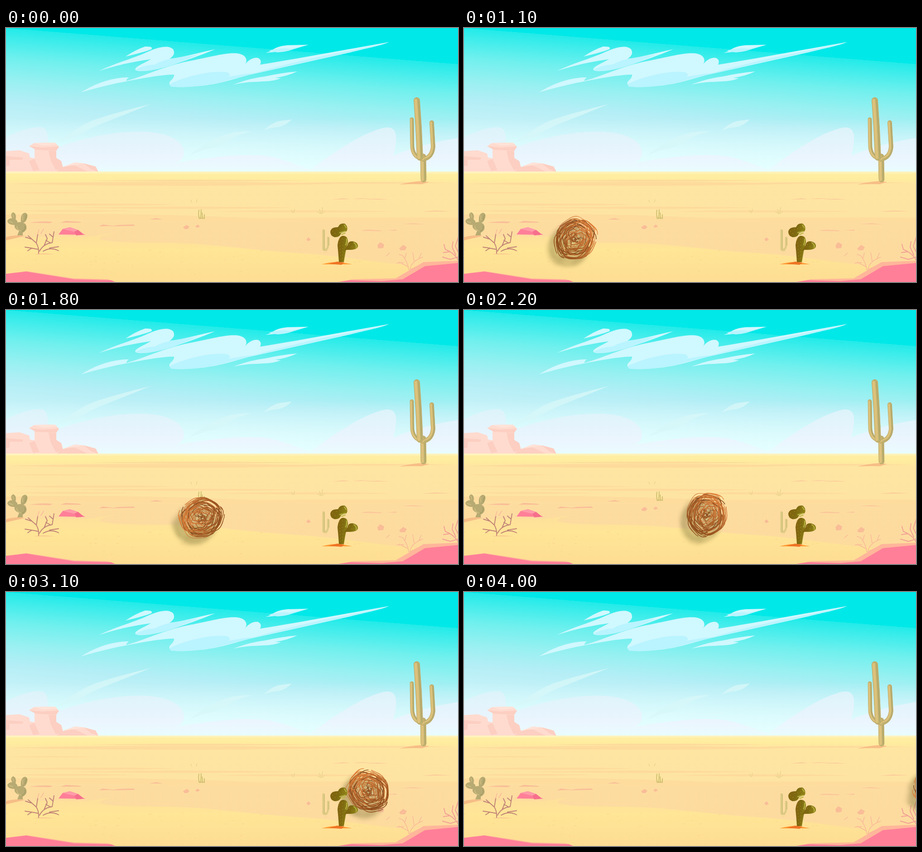
An HTML page that plays this animation: 998x561 px, repeating every 4100 ms.

```html
<!DOCTYPE html>
<html lang="en">
<head>
<meta charset="utf-8">
<title>Desert</title>
<style>
  html, body { margin: 0; width: 100%; height: 100%; overflow: hidden; background: #fee2a0; }
  svg { display: block; width: 998px; height: 561px; }
  #shade { filter: drop-shadow(-14px 15px 4px rgba(105, 96, 40, .45)); }
  .line { fill: none; stroke-linecap: round; stroke-linejoin: round; }
</style>
</head>
<body>
<svg viewBox="0 0 998 561">
  <defs>
    <linearGradient id="sky" gradientUnits="userSpaceOnUse" x1="0" y1="0" x2="-24" y2="300">
      <stop offset="0" stop-color="#00e8e8"/>
      <stop offset="0" stop-color="#22ebe9"/>
      <stop offset=".08" stop-color="#40edeb"/>
      <stop offset=".22" stop-color="#70f0ee"/>
      <stop offset=".38" stop-color="#98f0f1"/>
      <stop offset=".54" stop-color="#b6eef6"/>
      <stop offset=".68" stop-color="#c4f2f8"/>
      <stop offset="1" stop-color="#e0fdff"/>
    </linearGradient>
    <linearGradient id="haze" x2="0" y2="1">
      <stop offset="0" stop-color="#e6ffff" stop-opacity="0"/>
      <stop offset="1" stop-color="#e6ffff"/>
    </linearGradient>
    <linearGradient id="sand" x2="0" y2="1">
      <stop offset="0" stop-color="#fff0a6"/>
      <stop offset=".07" stop-color="#ffec9e"/>
      <stop offset=".12" stop-color="#fee5a2"/>
      <stop offset=".4" stop-color="#fee4a2"/>
      <stop offset=".46" stop-color="#fddca0"/>
      <stop offset=".75" stop-color="#fddb9f"/>
      <stop offset="1" stop-color="#fddc98"/>
    </linearGradient>
    <linearGradient id="dune" x2="0" y2="1">
      <stop offset="0" stop-color="#fee09b"/>
      <stop offset=".35" stop-color="#ffe596"/>
      <stop offset="1" stop-color="#fddd93"/>
    </linearGradient>
    <linearGradient id="hill" gradientUnits="userSpaceOnUse" x1="0" y1="218" x2="0" y2="316">
      <stop offset="0" stop-color="#dcf3fa"/>
      <stop offset=".7" stop-color="#ebf5fe"/>
      <stop offset="1" stop-color="#eafcff"/>
    </linearGradient>
    <linearGradient id="twig" gradientUnits="userSpaceOnUse" x1="-48" y1="-15" x2="48" y2="15">
      <stop offset="0" stop-color="#df7f38"/>
      <stop offset=".45" stop-color="#b5642a"/>
      <stop offset="1" stop-color="#8f4c1a"/>
    </linearGradient>
    <linearGradient id="pad" x2="1" y2=".3">
      <stop offset="0" stop-color="#84600f"/>
      <stop offset=".55" stop-color="#7d6910"/>
      <stop offset="1" stop-color="#918418"/>
    </linearGradient>
  </defs>

  <!-- sky and clouds -->
  <path fill="url(#sky)" d="M0 0H998V320H0z"/>
  <path fill="url(#haze)" d="M0 200H998V317H0z"/>
  <g fill="url(#hill)">
    <path d="M0 242C30 225 60 218 78 219Q94 222 92 252L60 290L0 300z"/>
    <path d="M100 268C190 236 250 228 305 229C370 232 398 256 392 282Q390 292 376 297C440 288 500 278 556 281C600 283 640 302 672 313V316H120z"/>
    <path d="M672 313C740 262 800 226 838 220C864 217 866 240 855 282Q915 256 998 243V316H660z"/>
  </g>
  <g fill="#d8f8f9" opacity=".8">
    <path d="M112 253Q165 213 200 201Q260 182 320 168Q240 200 200 216Q170 231 160 236L173 236Q140 243 112 253z"/>
    <path d="M404 282Q435 256 471 241Q502 227 543 228Q502 238 485 253L462 264Q430 269 404 282z"/>
    <path d="M569 226Q590 207 607 205L631 202Q618 216 600 219Q584 220 569 226z"/>
  </g>
  <g fill="#d0f8ff">
    <path d="M166 142C195 124 230 109 271 109Q265 114 266 117C315 103 352 82 415 71C458 62 488 54 510 56C530 58 536 72 526 82Q541 64 556 66Q566 70 561 81C660 65 748 48 846 31C825 40 790 46 760 54L535 104C500 113 466 127 402 130C366 132 354 127 364 116Q372 109 371 103C340 103 290 113 240 123Q200 132 166 142z"/>
    <path d="M205 95C245 76 282 67 314 52C340 40 361 38 369 47Q376 58 361 68C396 64 430 53 462 47C429 61 396 72 366 82C326 95 294 98 286 93Q282 88 305 77L320 69Q255 78 205 95z"/>
    <path d="M264 63Q286 48 307 41Q326 40 321 47Q303 54 264 63z"/>
    <path d="M573 55L585 51Q597 40 622 38L668 37Q650 42 634 47Q611 55 593 53z"/>
    <path d="M502 125Q538 111 572 107Q608 99 643 96Q619 107 594 110L607 111Q590 118 568 118L552 119Q530 119 502 125z"/>
  </g>
  <g fill="#b9f4ff">
    <path d="M365 122C405 104 460 93 489 98Q499 104 490 108C525 102 530 101 551 100L491 115C450 128 395 132 366 130Q358 126 365 122z"/>
    <path d="M286 92Q310 80 328 81Q348 69 378 66Q408 61 424 58Q388 76 348 87Q300 99 286 92z"/>
    <path d="M846 31Q800 45 729 60L535 103Q650 70 760 50z"/>
    <path d="M580 50Q605 43 628 46L660 39L631 48Q610 55 593 53z"/>
  </g>

  <!-- mesa -->
  <path fill="#ffdbcf" d="M0 272L30 270L51 277L53 286L63 288V266L51 261L62 254L108 253L117 262L111 271V287L122 294L126 307L152 297L172 299L198 306L204 318H0z"/>
  <path fill="#fccfc2" d="M51 261L80 264L117 262L111 271L66 269zM94 271L111 272V287L122 294L126 311L110 314L99 293zM0 283L38 286L36 291L8 291V304L0 305zM63 289L74 314L60 316L51 294zM126 307L150 303L166 310L180 317H112zM172 299L198 306L204 318L188 312z"/>
  <path fill="#ffe3d8" d="M62 254L108 253L112 257L82 260zM130 305L152 297L172 299L150 303z"/>

  <!-- sand -->
  <path fill="url(#sand)" d="M0 317H998V561H0z"/>
  <path fill="#fff3bd" d="M0 317H998V321H0z"/>
  <g fill="#fddb9c" id="streaks"></g>
  <path fill="#fddc9e" d="M0 412Q300 407 560 421Q780 417 998 420V428Q700 424 520 428L0 421z"/>
  <path fill="url(#dune)" d="M0 464L120 460Q180 464 205 457L240 453Q200 461 208 467Q240 474 325 474C450 473 520 490 660 498C770 506 850 526 998 532V561H0z"/>
  <g id="grains" stroke="#f6cc88" opacity=".7"></g>
  <g fill="#f9bd97">
    <path d="M53 430Q75 426 103 428L97 431zM120 430L132 426L163 428L166 430zM205 438L214 434L238 437zM231 438L249 435L282 434L285 437zM316 423L332 420L346 423z"/>
    <path d="M391 440L399 435L405 439L401 444H394zM418 438L424 434L428 439L421 441zM663 467L668 462L673 468L667 471z"/>
    <path d="M820 480L826 473L835 478L833 486L822 487zM868 487L877 479L885 484L881 491H871z"/>
    <path opacity=".65" d="M784 448Q795 444 812 446L832 447L826 449zM840 447L862 445L862 448zM872 433L900 431L926 434zM720 379L745 376L760 378zM763 378L782 376L813 377zM792 379L820 377L845 379zM917 406L948 403L984 405z"/>
  </g>
  <path fill="#ff7f98" d="M116 456L125 444L141 440L159 446L168 453L175 457z"/>
  <path fill="#ff9ba8" d="M125 444L141 440L159 446L151 450z"/>
  <path fill="#f66f8c" d="M151 450L159 446L169 454V457L155 458z"/>

  <!-- distant plants -->
  <g class="line" stroke="#c9bd69" stroke-width="1.7">
    <path d="M427 421Q424 412 426 402M430 421L431 401M434 421L433 408M438 421V412M426 420H438"/>
    <path stroke="#dfcc82" stroke-width="1" d="M633 408L630 402M635 408L637 400M695 410L692 400M697 410L699 396M698 410L704 405M694 410L688 406M410 385L408 380M420 385L422 379"/>
  </g>
  <g class="line" stroke="#ddca83">
    <path stroke-width="5" d="M701 447V488M702 490H707"/>
    <path stroke-width="4" d="M711 463V480Q711 489 704 490"/>
    <path stroke="#c8bd76" stroke-width="1.5" d="M703 447V488M713 463V480"/>
  </g>
  <path fill="#f6bd86" d="M0 462Q20 456 42 459L30 462L0 469z"/>
  <g fill="#b7aa72">
    <path d="M25 458L29 448Q14 442 21 431Q33 425 43 433Q50 445 37 452V458z"/>
    <path d="M23 435Q4 436 3 426Q8 417 20 422Q29 427 23 435zM14 421Q8 410 16 407Q24 410 21 423zM33 429Q31 410 42 408Q51 410 45 424Q41 431 37 430z"/>
  </g>
  <path class="line" stroke="#cdbb7d" stroke-width="2" d="M24 438Q24 446 33 448M7 427L15 430M15 411L17 418M37 414L37 424"/>
  <path class="line" stroke="#9f9a60" stroke-width="1.5" d="M42 437Q44 445 36 449M45 413L42 424"/>

  <!-- tall cactus -->
  <path fill="#f7be87" d="M868 346Q890 340 917 338L934 340L919 345Q893 344 868 346z"/>
  <g class="line" id="saguaro"></g>

  <!-- dry bushes -->
  <path fill="#f9c58f" d="M62 500Q80 496 108 500z"/>
  <g class="line">
    <path stroke="#c08377" stroke-width="1.9" d="M72 498Q73 485 67 475L49 459M71 489Q58 486 42 484M74 493Q82 477 102 474L106 450M82 493Q99 483 116 492M84 481L91 465L87 456M67 475L70 456M56 466L43 462M99 475L88 469M96 486L116 483M57 486L48 492M104 462L96 455"/>
    <path stroke="#f9bb98" stroke-width="1.6" d="M889 534Q888 519 876 503M889 528L868 517M892 533Q895 515 920 506M891 534L910 525M901 514L898 496M878 518L863 519M876 503L868 500M881 508L884 497M912 509L917 497M70 455L73 445M77 454L83 444M840 503L847 497"/>
    <path stroke="#f2a195" stroke-width="2" d="M998 512Q990 497 970 489M998 506L981 511L964 506M993 501L985 484L987 472M998 494L992 482L999 461M970 489L967 478M980 494L966 496"/>
  </g>

  <g id="shade"><g id="ball" class="line"></g></g>

  <!-- near cactus -->
  <path fill="#ff9b35" d="M697 522Q718 516 739 517L764 522z"/>
  <path fill="#ef7425" d="M712 521L731 516L747 518L741 523z"/>
  <g fill="url(#pad)">
    <path d="M735 517Q734 500 732 480Q734 461 743 459Q755 458 755 473Q750 490 746 517z"/>
    <path d="M746 493Q749 486 754 480Q755 471 764 471Q778 473 777 483Q774 491 752 490z"/>
    <path d="M716 450Q718 439 733 440Q737 430 748 432Q757 440 752 449L740 453Q737 463 725 462Q716 459 716 450z"/>
  </g>
  <path class="line" stroke="#b9b646" stroke-width="2" d="M737 452L749 449M741 456L749 453M752 466Q753 473 750 479M768 474Q775 479 773 485M747 435L751 441"/>
  <path class="line" stroke="#c29228" stroke-width="1.3" stroke-dasharray=".1 7" d="M736 468Q738 490 739 513M743 466Q744 488 742 513M758 478L768 486M721 449L730 457M730 445L746 440"/>

  <!-- foreground -->
  <path fill="#ffb69a" d="M732 561L765 555L860 553L922 517L998 514V561zM0 543L45 537L150 553L225 555L242 561H0z"/>
  <path fill="#ff7f98" d="M0 543L45 538L150 555L232 557L241 561H0zM734 561L760 557L830 559L876 555L925 526L998 519V561z"/>
</svg>
<script>
const $ = id => document.getElementById(id);

function rng(seed) {
  return () => (seed = seed * 16807 % 2147483647) / 2147483647;
}

function addPath(parent, d, attrs = {}) {
  const path = document.createElementNS('http://www.w3.org/2000/svg', 'path');
  path.setAttribute('d', d);
  for (const key in attrs) path.setAttribute(key, attrs[key]);
  parent.append(path);
}

// Flat sand streaks: x, y, width, height
for (const [x, y, w, h] of [
  [0, 344, 750, 9], [180, 337, 500, 4], [640, 342, 358, 4], [0, 390, 380, 5],
  [130, 397, 520, 5], [0, 404, 290, 4], [460, 405, 400, 5], [0, 364, 200, 3]
]) addPath($('streaks'), `M${x} ${y}q${w / 2} ${-h} ${w} 0q${-w / 2} ${h} ${-w} 0`);

const grain = rng(31);
for (let i = 0; i < 45; i++) {
  addPath($('grains'), `M${(grain() * 850).toFixed()} ${(485 + grain() * 60).toFixed()}h${(2 + grain() * 4).toFixed()}`);
}

// Tall cactus: spines, body, lit and shaded ribs
const limbs = [
  ['M921 284L922 335', 12],
  ['M896 202L897 262Q899 284 916 288', 8],
  ['M940 209L943 262Q941 286 921 290', 9],
  ['M907 160L911 220L914 286', 13]
];
for (const [d, w] of limbs) {
  const stripe = (stroke, width, dx = 0, dash = 'none') => addPath($('saguaro'), d, {
    stroke, 'stroke-width': width, 'stroke-dasharray': dash, transform: `translate(${dx})`
  });
  stripe('#c3a566', w + 1, 0, '.5 3');
  stripe('#bfb06e', w);
  stripe('#dcc17b', w * .5, -w * .18);
  stripe('#b0a76b', 1.5, w * .3);
}

// Tumbleweed: loose, tilted, wobbly loops of twig
const rand = rng(77);
for (let i = 0; i < 68; i++) {
  const size = 6 + 38 * rand();
  const start = rand() * 7, sweep = 1.8 + rand() * 3.2;
  const phase = rand() * 7, wobble = 2 + rand() * 3;
  const slack = 16 * (1 - size / 60);
  const cx = (rand() - .5) * slack, cy = (rand() - .5) * slack;
  let d = '';
  for (let k = 0; k <= 26; k++) {
    const a = start + sweep * k / 26;
    const r = size + wobble * Math.sin(a * 2 + phase) + 1.3 * Math.sin(a * 7 + phase);
    d += `${k ? 'L' : 'M'}${(cx + r * 1.06 * Math.cos(a)).toFixed(1)} ${(cy + r * .95 * Math.sin(a)).toFixed(1)}`;
  }
  const stroke = i % 5 == 0 ? '#834a1e' : i % 6 == 0 ? '#d57c3c' : 'url(#twig)';
  addPath($('ball'), d, { stroke, 'stroke-width': (.9 + rand() * .8).toFixed(2) });
}

const LOOP = 4100, STEP = 100;
function draw() {
  const n = Math.floor(performance.now() % LOOP / STEP);
  const roll = n + (n > 25); // the roll skips one step past mid-stage
  const x = -44 + 26.4 * roll, y = 481.5 - 1.34 * roll;
  $('ball').setAttribute('transform', `translate(${x} ${y}) rotate(${10 + 30 * (roll - 7)})`);
  $('shade').style.visibility = n ? 'visible' : 'hidden';
  requestAnimationFrame(draw);
}
draw();
</script>
</body>
</html>
```
